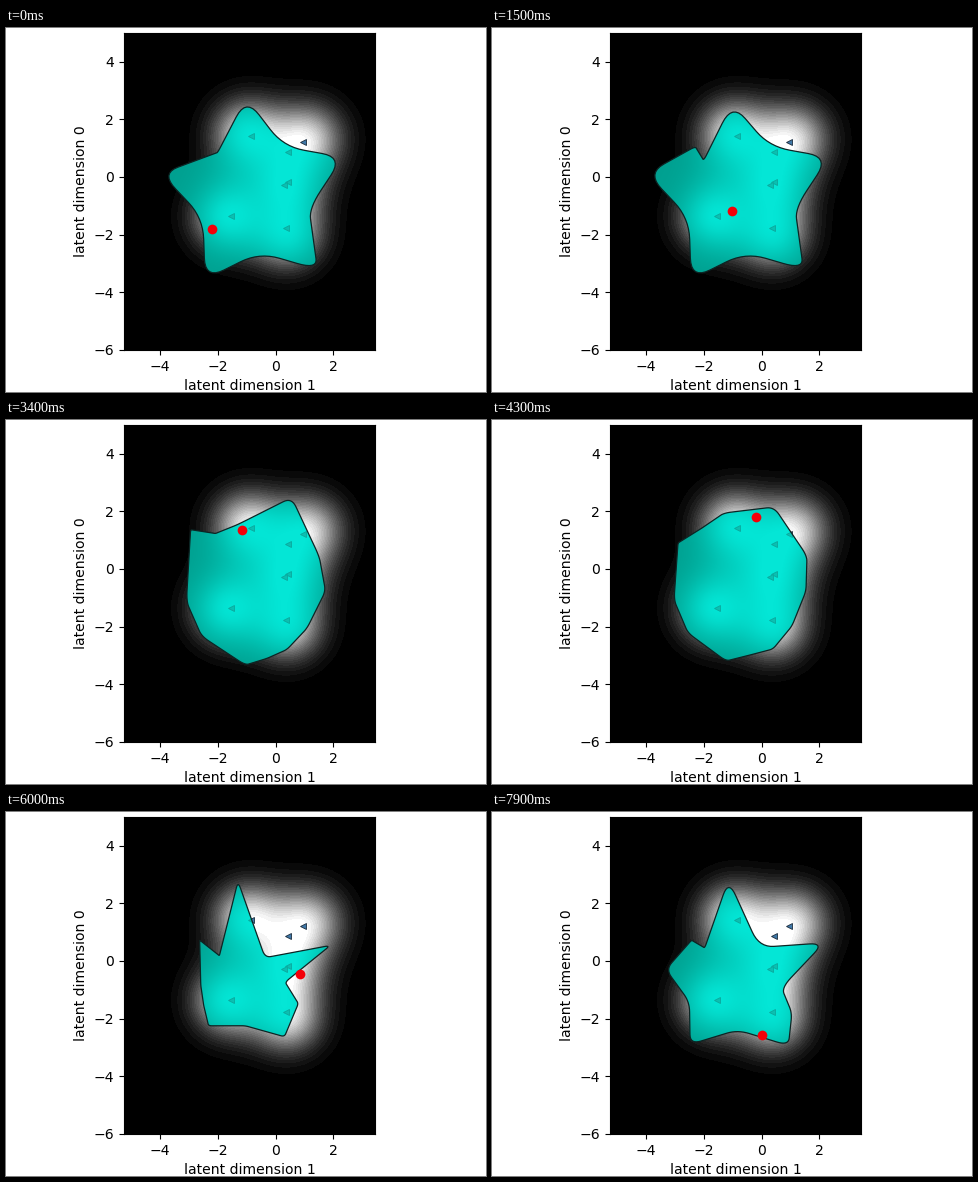
These frames come from a looping animation (480x364 px, 8 s). A matplotlib script:

```python
import numpy as np
import matplotlib.pyplot as plt
from matplotlib.animation import FuncAnimation
from matplotlib.colors import LinearSegmentedColormap
from matplotlib.patches import Polygon

W, H, DPI = 480, 364, 100
FRAMES, STEP = 80, 100
LEFT, RIGHT, TOP, BOTTOM = 118, 369, 5, 322
ORIGIN, UNIT = np.array([269.5, 148.9]), 28.8


def to_data(px):
    """Stage pixels to latent coordinates."""
    return (np.asarray(px, float) - ORIGIN) / (UNIT, -UNIT)


def star_outline(center=(248.5, 167.5), outer=96, inner=56, tilt=-5):
    """Five-pointed star, clockwise from the top, with two extra edge points."""
    a = np.radians(tilt + 36 * np.arange(10))
    r = np.where(np.arange(10) % 2, inner, outer)
    p = np.c_[r * np.sin(a), -1.02 * r * np.cos(a)] + center
    elbow = (p[3] + p[4]) / 2
    shoulder = .15 * p[8] + .85 * p[9]
    return np.vstack([p[:4], elbow, p[4:9], shoulder, p[9]])


blob = [(232, 93), (282, 87), (315, 136), (314, 171), (300, 206), (281, 229),
        (258, 235), (234, 241), (196, 213), (182, 180), (186, 123), (210, 108)]
spiky = [(232, 65), (255, 156), (326, 133), (273, 170), (291, 189), (278, 224),
         (236, 210), (197, 209), (198, 190), (197, 172), (195, 129), (214, 150)]
bases = np.array([star_outline(), blob, spiky])
base_rounding = np.array([.35, .15, .08])

# A crease lifts the left shoulder and presses the notch and top tip down
crease_y = np.zeros(12)
crease_y[[0, 10, 11]] = .6, -1, .9

# The shoulder and the notch beside it stay crisp
softness = np.ones((12, 1))
softness[10:] = .3

# time, dot x, dot y, share of star, share of spiky, crease
keys = np.array([
    (0, 205.5, 201.5, 1, 0, 0),
    (1500, 239.5, 183, 1, 0, 9),
    (2500, 219.5, 148, .35, -.35, 22),
    (4300, 264, 97, 0, 0, 0),
    (4800, 275.5, 115.5, .25, -.25, 0),
    (6000, 293.5, 162, 0, .85, 0),
    (7100, 297.5, 202, 0, 1, 0),
    (7900, 270, 222.5, .55, .45, 0)])
times, values = keys[:, 0], keys[:, 1:]
slopes = np.gradient(values, times, axis=0)


def state(t):
    """Smooth cubic path through the keys."""
    i = min(np.searchsorted(times, t, "right") - 1, len(times) - 2)
    h = times[i + 1] - times[i]
    u = (t - times[i]) / h
    return ((1 + 2 * u) * (1 - u) ** 2 * values[i]
            + u * (1 - u) ** 2 * h * slopes[i]
            + u * u * (3 - 2 * u) * values[i + 1]
            + u * u * (u - 1) * h * slopes[i + 1])


def round_corners(pts, amount):
    """Replace every corner by a quadratic curve."""
    c = amount * softness
    a = pts + c * (np.roll(pts, 1, 0) - pts)
    b = pts + c * (np.roll(pts, -1, 0) - pts)
    u = np.linspace(0, 1, 9)[None, :, None]
    curve = ((1 - u) ** 2 * a[:, None] + 2 * u * (1 - u) * pts[:, None]
             + u * u * b[:, None])
    return curve.reshape(-1, 2)


def outline(star, spike, crease):
    mix = np.array([star, 1 - star - spike, spike])
    pts = np.tensordot(mix, bases, 1)
    pts[:, 1] += crease * crease_y
    return round_corners(pts, mix @ base_rounding)


def kernel(a, b, length=1.45):
    d2 = ((a[:, None] - b[None]) ** 2).sum(-1)
    return np.exp(-d2 / (2 * length ** 2))


# Certainty of a Gaussian process over the latent plane
samples = np.array([(-.84, 1.41), (.96, 1.2), (.43, .86), (.44, -.16),
                    (.29, -.29), (-1.55, -1.35), (.36, -1.77)])
(xmin, ymax), (xmax, ymin) = to_data([(LEFT, TOP), (RIGHT, BOTTOM)])
gx, gy = np.meshgrid(np.linspace(xmin, xmax, RIGHT - LEFT),
                     np.linspace(ymin, ymax, BOTTOM - TOP))
k = kernel(np.c_[gx.ravel(), gy.ravel()], samples)
gram = kernel(samples, samples) + .08 * np.eye(len(samples))
certainty = (k @ np.linalg.inv(gram) * k).sum(1).reshape(gx.shape)
certainty = (certainty / certainty.max()) ** 1.7

plt.rcParams["font.size"] = 10.1
fig = plt.figure(figsize=(W / DPI, H / DPI), dpi=DPI, facecolor="white")
ax = fig.add_axes([LEFT / W, 1 - BOTTOM / H,
                   (RIGHT - LEFT) / W, (BOTTOM - TOP) / H], facecolor="black")
field = dict(extent=(xmin, xmax, ymin, ymax), origin="lower",
             aspect="auto", vmin=0, vmax=.95)
teal = LinearSegmentedColormap.from_list("teal", ["#00a090", "#04e6d6"])
marks = dict(ls="", marker="<", ms=4.4, mew=.6)

ax.imshow(certainty, cmap=plt.get_cmap("gray", 28), zorder=0, **field)
ax.plot(*samples.T, mfc="#3f78a8", mec="#1c2c3c", zorder=1, **marks)
fill = ax.imshow(certainty, cmap=teal, zorder=2, **field)
veiled, = ax.plot(*samples.T, mfc="#0cbfb1", mec="#0aa99d", zorder=3, **marks)
shape = Polygon(np.zeros((3, 2)), fc="none", ec="#0c2524", lw=.9, zorder=4)
ax.add_patch(shape)
for artist in (fill, veiled):
    artist.set_clip_path(shape)
dot, = ax.plot([], [], "o", ms=7, color="#f40008", mew=0, zorder=5)

ax.set(xlim=(xmin, xmax), ylim=(ymin, ymax),
       xticks=range(-4, 3, 2), yticks=range(-6, 5, 2),
       xlabel="latent dimension 1", ylabel="latent dimension 0")


def draw(frame):
    x, y, *mix = state(frame * STEP)
    shape.set_xy(to_data(outline(*mix)))
    dot.set_data(*to_data([(x, y)]).T)
    return fill, veiled, shape, dot


anim = FuncAnimation(fig, draw, frames=FRAMES, interval=STEP, repeat=True,
                     repeat_delay=0, blit=False)
plt.show()
```
